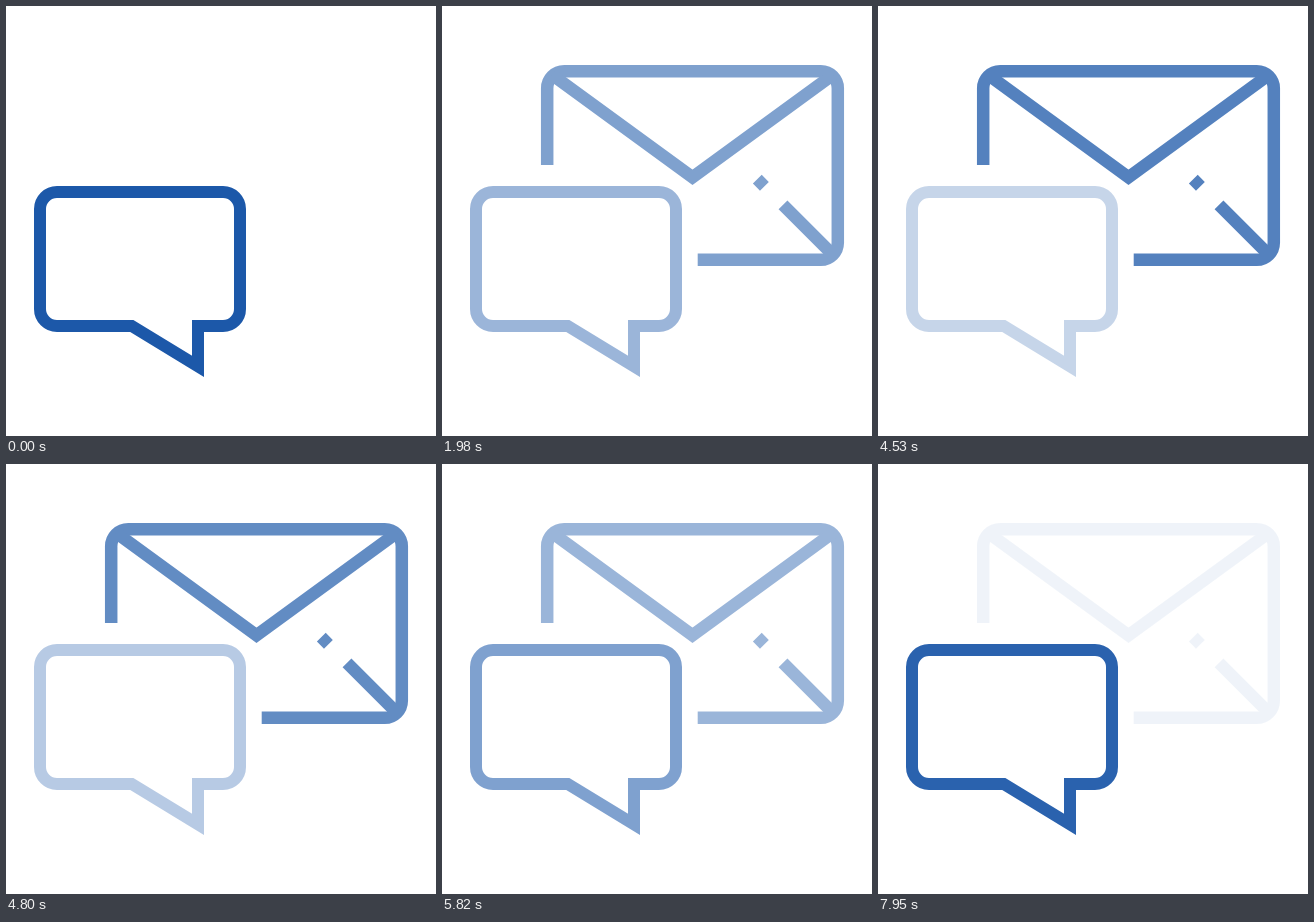
An HTML page that plays this animation: 430 px wide and 430 px high, repeating every 8000 ms.

```html
<!DOCTYPE html>
<html lang="en">
<head>
<meta charset="utf-8">
<title>Message and mail</title>
<style>
  html, body { margin: 0; width: 100%; height: 100%; overflow: hidden; background: #fff; }
  svg { display: block; width: 100%; height: 100%; }
</style>
</head>
<body>
<svg viewBox="0 0 430 430" fill="none" stroke="#1c58a9" stroke-width="12">
  <g id="mail" opacity="0" stroke-width="12.5">
    <path d="M105.2 159V82.2a17 17 0 0 1 17-17H378.8a17 17 0 0 1 17 17V236.8a17 17 0 0 1-17 17H255.7"/>
    <path d="M110 68.7L250.5 171.2L391 68.7"/>
    <path d="M315.3 173.2l7.1 7.1M341 198.9l49 49"/>
  </g>
  <g id="chat">
    <path d="M125.7 320H51a17 17 0 0 1-17-17V203a17 17 0 0 1 17-17H217a17 17 0 0 1 17 17V303a17 17 0 0 1-17 17H192V360.4Z"/>
  </g>
</svg>
<script>
  const LOOP = 8000, LEVELS = 16;
  // Pace of the cross-fade: [time in ms, steps taken]
  const pace = [[0, 0], [1500, 7], [3480, 16], [3780, 17], [5280, 23], [7560, 32], [7950, 33]];
  const mail = document.getElementById("mail");
  const chat = document.getElementById("chat");

  function stepAt(t) {
    const i = pace.findIndex(([time]) => time > t);
    if (i < 0) return pace[pace.length - 1][1];
    const [t0, n0] = pace[i - 1], [t1, n1] = pace[i];
    return Math.floor(n0 + (n1 - n0) * (t - t0) / (t1 - t0) + 1e-6);
  }

  function draw(t) {
    const n = stepAt(t) % (2 * LEVELS);
    const fade = 1 - Math.abs(n - LEVELS) / LEVELS;
    mail.setAttribute("opacity", fade);
    chat.setAttribute("opacity", 1 - fade);
  }

  const start = performance.now();
  function tick() {
    draw((performance.now() - start) % LOOP);
    requestAnimationFrame(tick);
  }
  tick();
</script>
</body>
</html>
```
